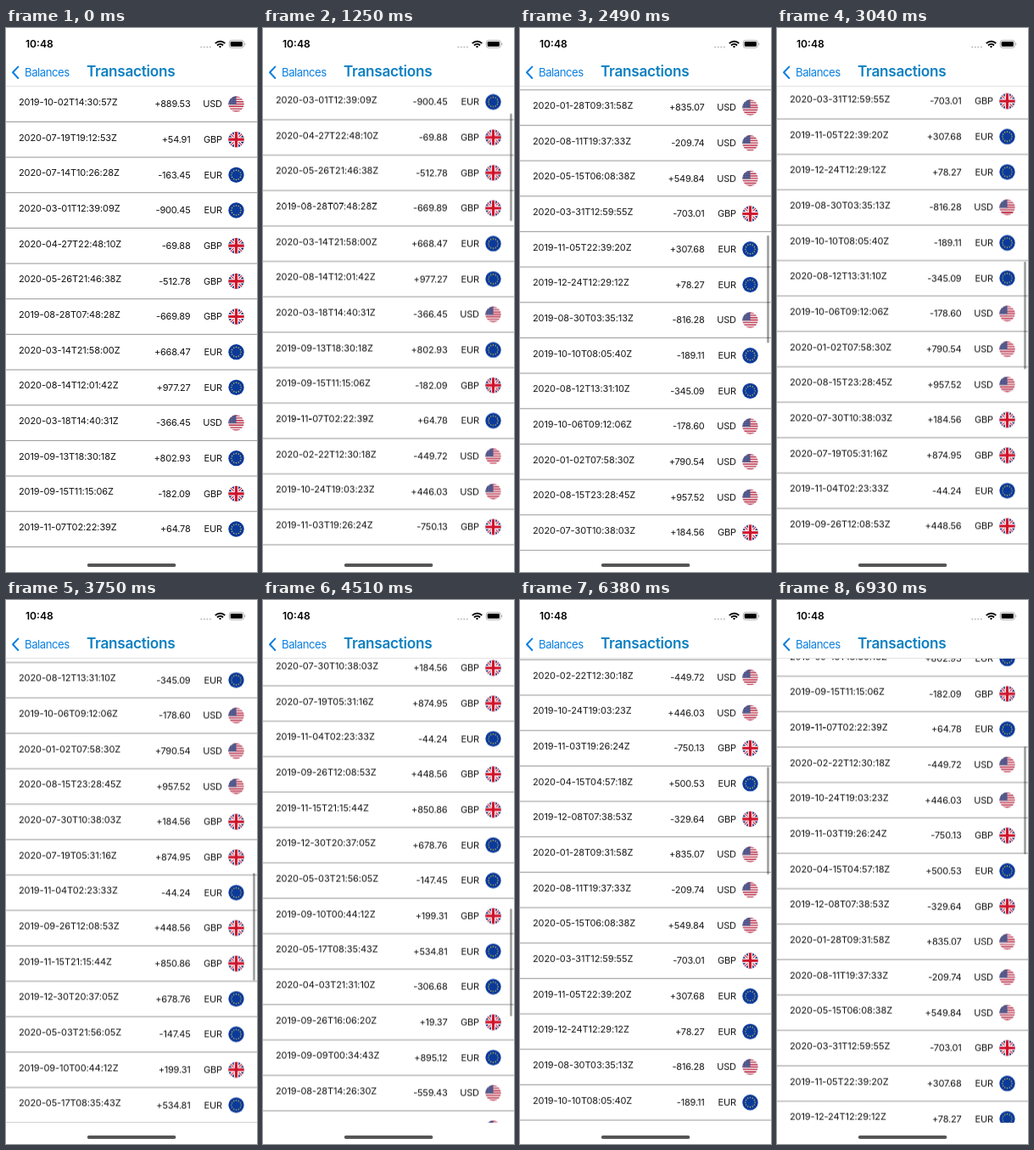
An HTML page for the animation above (7000 ms loop, 296x640 px).

```html
<!DOCTYPE html>
<html lang="en">
<head>
<meta charset="utf-8">
<title>Transactions</title>
<style>
  html, body { margin: 0; width: 100%; height: 100%; overflow: hidden; background: #fff; }
  svg { display: block; }
  text { font-family: Inter, "Liberation Sans", sans-serif; }
  .row { font-size: 11px; fill: #111; letter-spacing: -.1px; }
  .num { text-anchor: end; letter-spacing: -.2px; }
</style>
</head>
<body>
<svg width="296" height="640" viewBox="0 0 296 640">
  <defs>
    <clipPath id="disc"><circle r="9.2"/></clipPath>
    <clipPath id="view"><rect y="68.6" width="296" height="546"/></clipPath>
    <g id="USD" clip-path="url(#disc)">
      <rect x="-10" y="-10" width="20" height="20" fill="#f4f1f2"/>
      <path d="M0-9.2V9.2" stroke="#c0304a" stroke-width="20" stroke-dasharray="1.415"/>
      <rect x="-10" y="-10" width="10" height="10.7" fill="#41487f"/>
      <path d="M-7.5-6.6H0M-8.6-4.4H0M-8.6-2.2H0M-8.6 0H0" stroke="#dfe1ee" stroke-width=".7" stroke-dasharray=".8 1.4"/>
    </g>
    <g id="GBP" clip-path="url(#disc)">
      <rect x="-10" y="-10" width="20" height="20" fill="#10246e"/>
      <path d="M-10-10 10 10M10-10-10 10" stroke="#fff" stroke-width="3.4"/>
      <path d="M-10-10 10 10M10-10-10 10" stroke="#d0142c" stroke-width="1.1"/>
      <path d="M0-10V10M-10 0H10" stroke="#fff" stroke-width="5.4"/>
      <path d="M0-10V10M-10 0H10" stroke="#d0142c" stroke-width="3.2"/>
    </g>
    <g id="EUR">
      <circle r="9.2" fill="#0b3a9b"/>
      <circle r="5.6" fill="none" stroke="#e8cf3a" stroke-width="1.4" stroke-linecap="round" pathLength="12" stroke-dasharray="0 1"/>
    </g>
  </defs>

  <rect width="296" height="640" fill="#fff"/>
  <g clip-path="url(#view)"><g id="list"></g></g>
  <rect id="bar" x="291.2" y="71" width="2.6" height="126.5" rx="1.3" fill="#000" fill-opacity=".38"/>

  <path d="M0 68.5H296" stroke="#dcdcdc" stroke-width=".8"/>
  <text x="23" y="23.3" font-size="12.1" font-weight="600">10:48</text>
  <path d="M230.3 22.4H242" stroke="#bbb" stroke-width="2" stroke-linecap="round" stroke-dasharray="0 3.5"/>
  <g fill="none" stroke="#000" stroke-width="1.9">
    <path d="M246.8 18.1a8 8 0 0 1 11.4 0M249 20.5a5 5 0 0 1 7 0"/>
    <path d="M250.9 21.7a2.3 2.3 0 0 1 3.2 0L252.5 23.4Z" fill="#000" stroke="none"/>
  </g>
  <rect x="263.3" y="14.6" width="17" height="8.6" rx="2.4" fill="none" stroke="#999" stroke-width=".8"/>
  <rect x="264.7" y="16" width="14.2" height="5.8" rx="1.3"/>
  <path d="M281.5 17.5a1.6 1.6 0 0 1 0 2.9Z" fill="#999"/>
  <path d="M14.3 45.6 8 52.3 14.3 59" fill="none" stroke="#0a7fe0" stroke-width="2" stroke-linecap="round" stroke-linejoin="round"/>
  <text x="22" y="57" font-size="13.2" letter-spacing="-.5" fill="#0a7fe0">Balances</text>
  <text x="95" y="57" font-size="17.2" font-weight="600" letter-spacing="-.28" fill="#0f80c1">Transactions</text>
  <rect x="95.8" y="630" width="104.6" height="4" rx="2" fill="#555"/>
</svg>
<script>
const LOOP = 7000, PITCH = 41.667;

const rows = `2019-10-02T14:30:57Z +889.53 USD
2020-07-19T19:12:53Z +54.91 GBP
2020-07-14T10:26:28Z -163.45 EUR
2020-03-01T12:39:09Z -900.45 EUR
2020-04-27T22:48:10Z -69.88 GBP
2020-05-26T21:46:38Z -512.78 GBP
2019-08-28T07:48:28Z -669.89 GBP
2020-03-14T21:58:00Z +668.47 EUR
2020-08-14T12:01:42Z +977.27 EUR
2020-03-18T14:40:31Z -366.45 USD
2019-09-13T18:30:18Z +802.93 EUR
2019-09-15T11:15:06Z -182.09 GBP
2019-11-07T02:22:39Z +64.78 EUR
2020-02-22T12:30:18Z -449.72 USD
2019-10-24T19:03:23Z +446.03 USD
2019-11-03T19:26:24Z -750.13 GBP
2020-04-15T04:57:18Z +500.53 EUR
2019-12-08T07:38:53Z -329.64 GBP
2020-01-28T09:31:58Z +835.07 USD
2020-08-11T19:37:33Z -209.74 USD
2020-05-15T06:08:38Z +549.84 USD
2020-03-31T12:59:55Z -703.01 GBP
2019-11-05T22:39:20Z +307.68 EUR
2019-12-24T12:29:12Z +78.27 EUR
2019-08-30T03:35:13Z -816.28 USD
2019-10-10T08:05:40Z -189.11 EUR
2020-08-12T13:31:10Z -345.09 EUR
2019-10-06T09:12:06Z -178.60 USD
2020-01-02T07:58:30Z +790.54 USD
2020-08-15T23:28:45Z +957.52 USD
2020-07-30T10:38:03Z +184.56 GBP
2020-07-19T05:31:16Z +874.95 GBP
2019-11-04T02:23:33Z -44.24 EUR
2019-09-26T12:08:53Z +448.56 GBP
2019-11-15T21:15:44Z +850.86 GBP
2019-12-30T20:37:05Z +678.76 EUR
2020-05-03T21:56:05Z -147.45 EUR
2019-09-10T00:44:12Z +199.31 GBP
2020-05-17T08:35:43Z +534.81 EUR
2020-04-03T21:31:10Z -306.68 EUR
2019-09-26T16:06:20Z +19.37 GBP
2019-09-09T00:34:43Z +895.12 EUR
2019-08-28T14:26:30Z -559.43 USD
2020-01-19T10:52:07Z +120.35 USD`.split("\n").map(line => line.split(" "));

const list = document.getElementById("list");
const bar = document.getElementById("bar");

list.innerHTML = rows.map(([date, amount, code], i) => `
  <g class="row" transform="translate(0 ${(68.7 + i * PITCH).toFixed(2)})">
    <text x="15" y="22.2">${date}</text>
    <text class="num" x="217.5" y="24.7">${amount}</text>
    <text class="num" x="254.8" y="24.7">${code}</text>
    <use href="#${code}" x="271.5" y="20.8"/>
    <path d="M0 41.7H296" stroke="#888" stroke-width=".9"/>
  </g>`).join("");

// Flicks: touch time, then a moment and the scroll offset reached by it.
const flicks = [
  [960, 1920, 574.3],
  [2150, 3040, 878.5],
  [3390, 4510, 1259.5],
  [4530, 5400, 923.2],
  [5715, 6380, 540.2]
];

// Short drag, then exponential slowdown.
const DRAG = 150, TAU = 500;
const glide = u => u < DRAG
  ? u * u / (2 * DRAG)
  : DRAG / 2 + TAU * (1 - Math.exp((DRAG - u) / TAU));

function scrollAt(t) {
  let pos = 0;
  for (const [i, [start, at, reached]] of flicks.entries()) {
    if (t < start) break;
    const end = Math.min(t, flicks[i + 1]?.[0] ?? LOOP);
    pos += (reached - pos) * glide(end - start) / glide(at - start);
  }
  return pos;
}

// Screen refreshes: first time, last time, count.
const bursts = [
  [1030, 1700, 7], [1800, 1920, 2], [2020, 2120, 2], [2260, 2920, 7],
  [3040, 3360, 4], [3520, 4190, 7], [4290, 4950, 7], [5050, 5400, 4],
  [5520, 5730, 3], [5840, 6380, 6], [6500, 6500, 1], [6600, 6930, 4]
];
const times = bursts.flatMap(([a, b, n]) =>
  Array.from({ length: n }, (_, k) => a + (n > 1 ? k * (b - a) / (n - 1) : 0)));

function play(el, style) {
  const key = (t, at = t) => ({ offset: at / LOOP, easing: "steps(1, end)", ...style(scrollAt(t), t) });
  const keys = [key(0), ...times.map(t => key(t)), key(times.at(-1), LOOP)];
  el.animate(keys, { duration: LOOP, iterations: Infinity }).startTime = 0;
}

const shift = y => `translateY(${y.toFixed(2)}px)`;
play(list, pos => ({ transform: shift(-pos) }));
play(bar, (pos, t) => ({ transform: shift(pos * .232), opacity: t ? 1 : 0 }));
</script>
</body>
</html>
```
